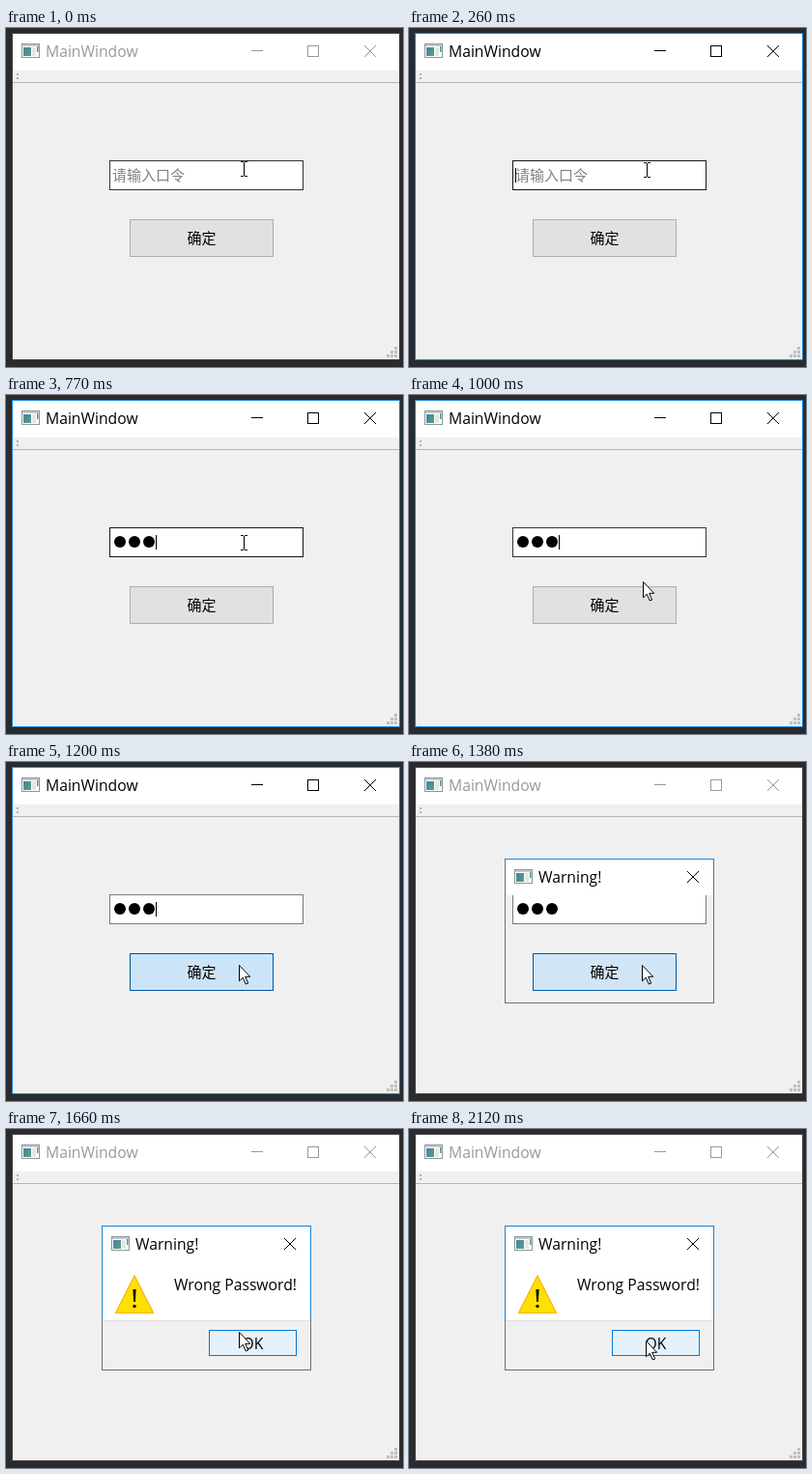
Animation of 411x351 px, one loop 2220 ms. Source, as an HTML page:

```html
<!DOCTYPE html>
<html lang="zh-CN">
<head>
<meta charset="utf-8">
<style>
html, body { margin: 0; width: 100%; height: 100%; overflow: hidden; background: #2b2b2d; }
svg { display: block; }
text { font: 15.7px "Open Sans", "Noto Sans", sans-serif; white-space: pre; }
.zh { font: 15px "Noto Sans CJK SC", "Noto Sans CJK", sans-serif; }
.crisp { shape-rendering: crispEdges; }
.line { fill: none; stroke: currentColor; }
</style>
</head>
<body>
<svg width="411" height="351" viewBox="0 0 411 351">
  <defs>
    <linearGradient id="pane" x2="1" y2="1">
      <stop stop-color="#4a7fa8"/><stop offset="1" stop-color="#58a07c"/>
    </linearGradient>
    <g id="app">
      <path class="crisp" fill="#fff" stroke="#8b969c" d="M.5 .5h18v14h-18z"/>
      <path fill="#c3cacd" d="M1 1h17v2H1z"/>
      <path fill="url(#pane)" d="M2 4h8v9H2z"/>
      <path fill="#e3e6e8" d="M11 4h4v9h-4z"/>
      <path fill="#4f9a72" d="M16 3h1.5v6H16z"/>
    </g>
    <path id="cross" class="line" d="M0 0l12 12M12 0L0 12"/>
  </defs>

  <rect id="frame" class="crisp" x="6" y="5" width="402" height="339"/>
  <path class="crisp" fill="#f0f0f0" d="M7 6h400v337H7z"/>
  <path class="crisp" fill="#fff" d="M7 6h400v38H7z"/>
  <path class="crisp" fill="#b5b5b5" d="M7 56h400v1H7z"/>
  <path class="crisp" fill="#b0b0b0" d="M11 47h2v2h-2zM11 51h2v2h-2z"/>
  <path class="crisp" fill="#bfbfbf" d="M402 330h3v3h-3zM398 334h3v3h-3zM402 334h3v3h-3zM394 338h3v3h-3zM398 338h3v3h-3zM402 338h3v3h-3z"/>
  <use href="#app" x="16" y="16"/>
  <g id="caption">
    <text x="41" y="30" fill="currentColor">MainWindow</text>
    <path class="line crisp" d="M254 23.5h12M312.5 18.5h11v11h-11z"/>
    <use href="#cross" x="371" y="18"/>
  </g>

  <rect id="field" class="crisp" x="107.5" y="137.5" width="200" height="30" fill="#fff"/>
  <text id="hint" class="zh" x="110" y="158" fill="#808080">请输入口令</text>
  <g id="dots"><circle cx="118" cy="152" r="6"/><circle cx="133" cy="152" r="6"/><circle cx="148" cy="152" r="6"/></g>
  <rect id="caret" class="crisp" y="145" width="1" height="15"/>
  <rect id="button" class="crisp" x="128.5" y="198.5" width="148" height="38"/>
  <text class="zh" x="187.5" y="223">确定</text>

  <g id="dialog">
    <g id="body">
      <path class="crisp" fill="#fff" d="M100 138h215v60H100z"/>
      <path class="crisp" fill="#f0f0f0" d="M100 198h215v51H100z"/>
      <path class="crisp" fill="#dfdfdf" d="M100 198h215v1H100z"/>
      <path fill="#ffe100" stroke="#f9b91c" stroke-width="1.5" stroke-linejoin="round" d="M133 152l19.5 38.5h-39z"/>
      <path d="M131.4 166h3.2l-.8 13h-1.6z"/><circle cx="133" cy="183.5" r="1.7"/>
      <text x="174" y="167">Wrong Password!</text>
      <rect id="ok" class="crisp" x="210.5" y="208.5" width="90" height="26" stroke="#0078d7"/>
      <text x="244.5" y="228">OK</text>
    </g>
    <path class="crisp" fill="#fff" d="M100 101h215v37H100z"/>
    <path class="line crisp" color="#707070" d="M99.5 100v149.5h216V100"/>
    <path id="edge" class="line crisp" color="#1883d7"/>
    <use href="#app" x="109" y="111"/>
    <text x="134" y="125">Warning!</text>
    <use href="#cross" x="288" y="113"/>
  </g>

  <path id="beam" class="line crisp" d="M-3 -7.5h3M1 -7.5h3M.5 -7V7M-3 7.5h3M1 7.5h3"/>
  <path id="arrow" fill="#fff" stroke="#000" d="M.5 .5v16.3l3.8-3.6 3 6.8 2.4-1-3-6.7h5z"/>
</svg>
<script>
const LOOP = 2220;
const el = id => document.getElementById(id);
const set = (id, attrs) => { for (const k in attrs) el(id).setAttribute(k, attrs[k]); };
const show = (id, on) => set(id, { visibility: on ? 'inherit' : 'hidden' });
// Each track holds [start, ...values] steps in order of time.
const at = (track, t) => track.findLast(step => step[0] <= t).slice(1);

const pointer = [
  [0, 246, 146], [180, 246, 147], [720, 246, 153], [820, 246, 155], [860, 246, 161],
  [900, 245, 172], [950, 243, 183], [1000, 242, 193], [1050, 241, 202], [1100, 241, 208],
  [1150, 241, 210], [1940, 242, 212], [2000, 243, 214], [2060, 244, 217], [2120, 245, 219]
];
const fieldEdge = [[0, '#333'], [30, '#171717'], [950, '#222'], [1000, '#333'], [1050, '#555'], [1100, '#7a7a7a']];
const buttonLook = [
  [0, '#e1e1e1', '#adadad'], [1050, '#e3e9ee', '#5793c2'], [1100, '#e5f1fb', '#0078d7'],
  [1200, '#cce4f7', '#005499'], [1380, '#d1e5f7', '#0059a2']
];
const okFill = [[0, '#e1e1e1'], [1610, '#e3e9ee'], [1660, '#e5f1fb']];
const typed = [[0, 0], [490, 1], [570, 2], [640, 3]];

function draw(t) {
  const active = t >= 180 && t < 1280;
  const [count] = at(typed, t);
  const [x, y] = at(pointer, t);
  const [fill, stroke] = at(buttonLook, t);
  const opening = t < 1380, ready = t >= 1430;

  set('frame', { fill: active ? '#1883d7' : '#434343' });
  set('caption', { color: active ? '#000' : '#999' });
  set('field', { stroke: at(fieldEdge, t)[0] });
  show('hint', !count);
  [...el('dots').children].forEach((dot, i) => dot.setAttribute('visibility', i < count ? 'visible' : 'hidden'));
  show('caret', active && t >= 260);
  set('caret', { x: 110 + count * 15 });
  set('button', { fill, stroke });

  show('dialog', t >= 1330);
  set('dialog', {
    opacity: opening ? .5 : 1,
    transform: opening ? 'translate(207.5 175) scale(.95) translate(-207.5 -175)' : ''
  });
  show('body', ready);
  set('edge', { d: ready ? 'M99.5 198V100.5h216V198' : 'M99 100.5h217' });
  set('ok', { fill: at(okFill, t)[0] });

  const typing = t < 900;
  show('beam', typing);
  show('arrow', !typing);
  set(typing ? 'beam' : 'arrow', { transform: `translate(${x} ${y})` });
}

const start = performance.now();
function tick() {
  draw((performance.now() - start) % LOOP);
  requestAnimationFrame(tick);
}
tick();
</script>
</body>
</html>
```
